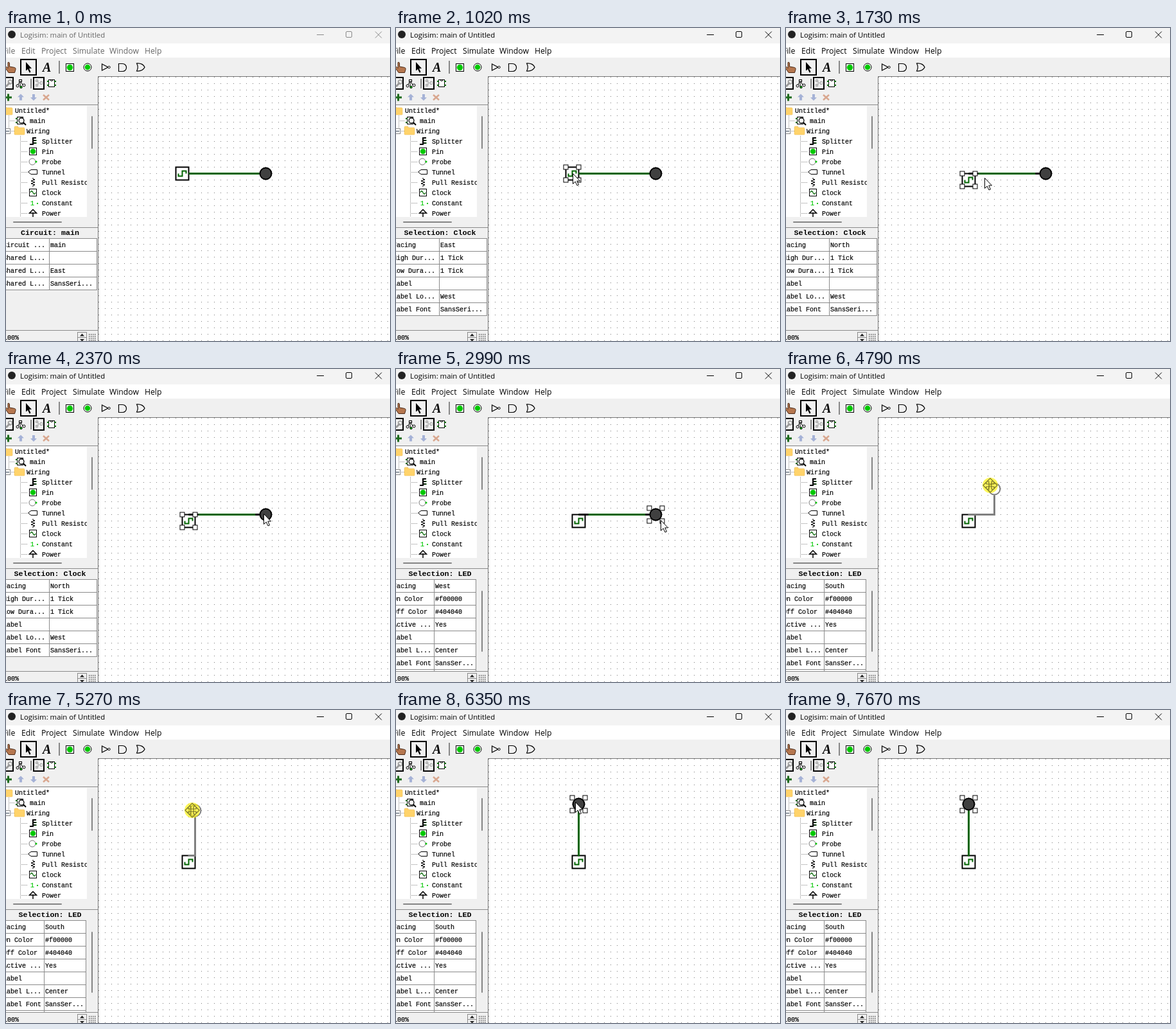
Recreate the animation shown at these times as an HTML page. Size 598 px wide and 487 px high, loop 7.91 s.

```html
<!DOCTYPE html>
<html lang="en">
<head>
<meta charset="utf-8">
<title>Circuit editor</title>
<style>
  html, body { margin: 0; width: 100%; height: 100%; overflow: hidden; background: #fff; }
  svg { display: block; }
  text { white-space: pre; }
  .ui { font-family: "Open Sans", "Noto Sans", sans-serif; }
  .mono { font: 10px "Liberation Mono", "DejaVu Sans Mono", monospace; stroke: #000; stroke-width: .2; }
  .head { font: bold 11.67px "Liberation Mono", monospace; text-anchor: middle; }
</style>
</head>
<body>
<svg id="stage" width="598" height="487" viewBox="0 0 598 487">
  <defs>
    <pattern id="grid" x="4" y="6" width="10" height="10" patternUnits="userSpaceOnUse">
      <rect width="1" height="1" fill="#777"/>
    </pattern>
    <pattern id="mini" x="129" y="476" width="3" height="3" patternUnits="userSpaceOnUse">
      <rect width="1.4" height="1.4" fill="#444"/>
    </pattern>
    <clipPath id="treeClip"><rect y="121" width="126" height="173"/></clipPath>
    <clipPath id="tableClip"><rect y="311" width="142" height="159"/></clipPath>
  </defs>
  <rect width="598" height="487" fill="#f0f0f0"/>
  <rect width="598" height="24" fill="#f3f3f3"/>
  <rect y="24" width="598" height="22" fill="#fff"/>
  <rect x="144" y="76" width="454" height="411" fill="#fff"/>
  <rect x="144" y="76" width="454" height="411" fill="url(#grid)"/>
  <path d="M143.5 487V75.5H598" fill="none" stroke="#777"/>
  <g id="chrome"></g>
  <g id="tools"></g>
  <g id="tree" clip-path="url(#treeClip)"></g>
  <path d="M134 138V187M12 302H86" stroke="#858585" stroke-width="2" stroke-linecap="round"/>
  <path d="M0 119.5H143M0 310.5H143M0 470.5H143" stroke="#8a8a8a"/>
  <g id="table" clip-path="url(#tableClip)"></g>
  <g id="status"></g>
  <g id="circuit" transform="translate(.5 .5)"></g>
  <g id="pointer"></g>
</svg>
<script>
const LOOP = 7910;
const el = id => document.getElementById(id);
const label = (x, y, s, cls = 'mono', extra = '') => `<text x="${x}" y="${y}" class="${cls}" ${extra}>${s}</text>`;
const line = (d, color = '#000', width = 1, extra = '') =>
  `<path d="${d}" fill="none" stroke="${color}" stroke-width="${width}" ${extra}/>`;
const shape = (d, fill, stroke = 'none', width = 1) =>
  `<path d="${d}" fill="${fill}" stroke="${stroke}" stroke-width="${width}"/>`;
const rect = (x, y, w, h, fill = 'none', stroke = '#000', width = 1) =>
  `<rect x="${x}" y="${y}" width="${w}" height="${h}" fill="${fill}" stroke="${stroke}" stroke-width="${width}"/>`;
const dot = (x, y, r, fill, stroke = 'none', width = 1) =>
  `<circle cx="${x}" cy="${y}" r="${r}" fill="${fill}" stroke="${stroke}" stroke-width="${width}"/>`;
const at = (x, y, body) => `<g transform="translate(${x} ${y})">${body}</g>`;

const LIME = '#00c800', WIRE = '#006400', GHOST = '#808080';

function chrome(active) {
  const ink = active ? '#000' : '#8a8a8a';
  const menuInk = active ? '#000' : '#666';
  const menus = [['File', -5], ['Edit', 24], ['Project', 55], ['Simulate', 104], ['Window', 161], ['Help', 216]];
  return dot(9, 10, 6, '#222') +
    label(22, 15, 'Logisim: main of Untitled', 'ui', `font-size="11.35" fill="${active ? '#000' : '#666'}"`) +
    menus.map(([s, x]) => label(x, 40, s, 'ui', `font-size="12.2" fill="${menuInk}"`)).join('') +
    line('M484 10.5H495M575 5.5L585 15.5M585 5.5L575 15.5', ink) +
    `<rect x="529.5" y="5.5" width="9" height="9" rx="1.5" fill="none" stroke="${ink}"/>`;
}

function tools() {
  const plusArrow = 'M0 -5L5 0H2V5H-2V0H-5Z';
  return shape('M3 53.5q2 -1 2.5 1V60l8 1.5q2 .5 1.500 3l-1.500 5H4L-1 62q0 -2 2 -1.500l2 2Z', '#b5774f', '#4b2a18') +
    rect(23, 49, 24, 24, 'none', '#000', 2) +
    shape('M31 53V66.500l3 -2.500 2.500 5.500 2 -1 -2.500 -5.500H40Z', '#000') +
    label(57, 68, 'A', '', 'font-family="Liberation Serif, serif" font-size="20" font-weight="bold" font-style="italic"') +
    line('M83 51V71', '#888', 2) +
    rect(93.5, 55.5, 12, 12, '#fff') + dot(99.5, 61.5, 4.7, LIME) +
    dot(127, 61, 6, '#fff', '#000') + dot(127, 61, 4.3, LIME) +
    line('M149.500 56V66L159 61Z', '#000', 1.2) + dot(160.5, 61, 1.700, '#fff', '#000') +
    line('M175.500 55.500H181.500A6 6 0 0 1 181.500 67.500H175.500Z', '#000', 1.2) +
    line('M203.500 55Q213 54.500 216 61Q213 67.500 203.500 67Q207 61 203.500 55Z', '#000', 1.2) +
    rect(-8, 77, 19, 18, 'none', '#000', 2) +
    line('M0 91L6 85', '#999', 3) + dot(6.500, 84, 3, 'none', '#999', 1.500) +
    line('M22 82L18 90M22 82L27 90M22 82V91', '#000', 1) +
    rect(20.500, 80.500, 4, 3, '#fff') + dot(18, 90, 2, '#fff', '#000') + dot(23.500, 92, 1.700, LIME, '#000') + dot(28, 89, 2, '#fff', '#000') +
    line('M39 79V94', '#888', 2) +
    rect(43, 77, 16, 18, 'none', '#000', 2) +
    line('M47 82H50V89H47M50 85.500H53', '#aaa') + rect(46.500, 80.500, 3, 3, 'none', '#aaa') + rect(53.500, 83.500, 3, 4, 'none', '#aaa') + rect(46.500, 87.500, 3, 3, 'none', '#aaa') +
    rect(66.500, 80.500, 9, 11, '#fff') + line('M64 83H67M64 89H67M75 83H78M75 89H78', WIRE, 2) + line('M69 80.500a2 2 0 0 0 4 0') +
    line('M-2 108H9M3.500 102.500V113.500', '#1d6b1d', 3) +
    at(23, 107.500, shape(plusArrow, '#a5b2d6')) + at(43, 108, `<g transform="rotate(180)">${shape(plusArrow, '#a5b2d6')}</g>`) +
    line('M58 104L67 112M67 104L58 112', '#d9a78f', 2.500);
}

function tree() {
  const folder = 'M0 1.500Q0 0 1.500 0H5L7 2H14.500Q16 2 16 3.500V12Q16 13 15 13H1Q0 13 0 12Z';
  const items = ['Splitter', 'Pin', 'Probe', 'Tunnel', 'Pull Resistor', 'Clock', 'Constant', 'Power'];
  const icons = [
    line('M-5 5H0V-5H5M0 -1H5M0 3H5', '#000', 2) + line('M2 -1H6M2 3H6', WIRE),
    rect(-5.500, -5.500, 11, 11, '#fff') + dot(0, 0, 4.300, LIME),
    dot(-1, 0, 5, '#fff', '#777') + dot(5, 0, 1.500, LIME),
    line('M-7.500 0L-3 -3.500H6.500V3.500H-3Z'),
    line('M0 -7V-5L3 -4L-3 -2L3 0L-3 2L3 4L0 5V7'),
    rect(-5.500, -5.500, 11, 11, '#fff') + line('M-4 0Q-2 -5 0 0T4 0', WIRE, 1.300),
    label(-4, 4, '1', 'mono', `style="fill:${LIME};stroke:${LIME}"`) + rect(6, 0, 2, 2, LIME, 'none'),
    line('M0 6V-1M-5.500 0L0 -5.500L5.500 0Z', '#000', 1.500)
  ];
  const dotted = 'stroke-dasharray="1 1"';
  let out = rect(0, 120, 126, 174, '#fff', 'none') +
    line('M4.500 136V156M4 144.500H14M22.500 168V294M8 160.500H13', '#888', 1, dotted) +
    at(-6, 122, shape(folder, '#ffd36b', '#e8b64a', .5)) + label(14, 132, 'Untitled*') +
    rect(17.500, 138.500, 9, 11, '#fff') + line('M15 141H18M15 147H18', WIRE, 2) +
    dot(24, 144, 4, '#fff', '#000', 1.300) + line('M27 147L31 151', '#000', 2) + label(37, 148, 'main') +
    rect(-1.500, 156.500, 8, 8, '#fff', '#888') + line('M0 160.500H5', '#345') +
    at(13, 153, shape(folder, '#ffd36b', '#e8b64a', .5)) + label(32, 164, 'Wiring');
  items.forEach((name, i) => {
    const y = 176 + 16 * i;
    out += line(`M22 ${y + .5}H33`, '#888', 1, dotted) + at(42, y, icons[i]) + label(56, y + 4, name);
  });
  return out;
}

const clockRows = facing => [['Facing', facing], ['High Dur...', '1 Tick'], ['Low Dura...', '1 Tick'],
  ['Label', ''], ['Label Lo...', 'West'], ['Label Font', 'SansSeri...']];
const ledRows = facing => [['Facing', facing], ['On Color', '#f00000'], ['Off Color', '#404040'],
  ['Active ...', 'Yes'], ['Label', ''], ['Label L...', 'Center'], ['Label Font', 'SansSer...']];
const mainRows = [['Circuit ...', 'main'], ['Shared L...', ''], ['Shared L...', 'East'], ['Shared L...', 'SansSeri...']];

function table(title, rows, narrow) {
  const [mid, right] = narrow ? [59.5, 124.5] : [67.5, 141.5];
  const bottom = 327.5 + 20 * rows.length;
  let out = label(68.5, 322, title, 'head') + rect(-1, 327.5, right + 1, bottom - 327.5, '#fff', '#8a8a8a') +
    line(`M${mid} 327V${Math.min(bottom, 470)}`, '#8a8a8a');
  if (narrow) out += rect(0, 468, 124, 3, '#fff', 'none') + line('M59.5 467V470M124.5 467V470', '#8a8a8a') +
    line('M134 346V439', '#858585', 2, 'stroke-linecap="round"');
  rows.forEach(([key, value], i) => {
    const y = 341 + 20 * i;
    out += line(`M0 ${y + 6.5}H${right}`, '#8a8a8a') + label(-5, y, key) + label(mid + 1.5, y, value);
  });
  return out;
}

const status = () => label(-4, 485, '100%') +
  rect(111.5, 473.5, 14, 8, '#f0f0f0', '#8a8a8a') + rect(111.5, 481.5, 14, 8, '#f0f0f0', '#8a8a8a') +
  shape('M115 479.500H122L118.500 475.500ZM115 484H122L118.500 487.500Z', '#222') +
  rect(129, 476, 12, 11, 'url(#mini)', 'none');

const handles = (x, y) => [[-10, -10], [10, -10], [-10, 10], [10, 10]]
  .map(([dx, dy]) => rect(x + dx - 3.5, y + dy - 3.5, 7, 7, '#fff')).join('');
const clock = (x, y) => rect(x - 10, y - 10, 20, 20, '#fff', '#000', 2) +
  line(`M${x - 6} ${y}v4h6v-8h6v4`, WIRE, 2);
const led = (x, y) => dot(x, y, 9, '#404040', '#000', 2);

// Times of the user's actions, in ms
const CLICK_CLOCK = 640, TURN_CLOCK = 1560, CLICK_LED = 2530, TURN_LED = 3140, DRAG = 4180, DROP = 6350, LEAVE = 7670;
const between = (t, a, b) => t >= a && t < b;

const path = [
  [150, 430, 400], [620, 276, 228], [780, 275, 226], [1020, 275, 226], [1200, 279, 221], [1410, 282, 235],
  [1560, 282, 235], [2280, 397, 226], [2370, 401, 225], [2530, 401, 225], [2990, 412, 235], [3470, 412, 235],
  [3700, 391, 215], [3940, 392, 213], [4180, 392, 213], [4320, 363, 209], [4400, 363, 209], [4950, 299, 169],
  [5030, 299, 169], [5270, 290, 156], [5350, 290, 156], [5810, 281, 143], [6349, 281, 143], [6350, 279, 143],
  [7200, 279, 143], [7670, 466, 490]
];

function pointerAt(t) {
  const i = Math.max(1, path.findIndex(k => k[0] > t));
  const [t0, x0, y0] = path[i - 1], [t1, x1, y1] = path[i];
  const p = Math.max(0, (t - t0) / (t1 - t0));
  return [Math.round(x0 + (x1 - x0) * p), Math.round(y0 + (y1 - y0) * p)];
}

const snap = v => 10 * Math.round(v / 10);

function circuit(t) {
  const turned = t >= TURN_CLOCK;
  const [cx, cy] = turned ? [284, 236] : [274, 226];
  const clockBody = clock(cx, cy) + (between(t, CLICK_CLOCK, CLICK_LED) ? handles(cx, cy) : '');
  if (t >= DROP) return clockBody + line('M284 155V227', WIRE, 3) + led(284, 146) + handles(284, 146);
  if (t >= DRAG) {
    const [px, py] = pointerAt(t);
    const x = 394 + snap(px - 392), y = 216 + snap(py - 213);
    return clockBody + line(`M283 226H${x}V${y + 10}`, GHOST, 3) + dot(x, y, 9, 'none', GHOST, 2);
  }
  const [lx, ly] = t >= TURN_LED ? [394, 216] : [404, 226];
  const stubs = turned ? line('M284 226H299M388 226H394', '#000', 3) : '';
  return clock(cx, cy) + line('M284 226H395', WIRE, 3) + stubs + led(lx, ly) +
    (between(t, CLICK_CLOCK, CLICK_LED) ? handles(cx, cy) : '') + (t >= CLICK_LED ? handles(lx, ly) : '');
}

const arrow = shape('M.5 .5V16.500L4.200 13L7 19L9.500 18L6.800 12H11.500Z', '#fff', '#000');
const moveArrows = [0, 90, 180, 270].map(a =>
  `<g transform="rotate(${a})">${line('M-2 -2V-6H-5L0 -11L5 -6H2V-2Z', '#77742c', 1.2)}</g>`).join('');

function pointer(t) {
  if (t < 150 || t >= LEAVE) return '';
  const dragging = between(t, DRAG, DROP);
  const pressed = dragging || between(t, CLICK_CLOCK, 720) || between(t, CLICK_LED, 2650);
  const glow = pressed ? '<circle r="12" fill="#fff200" fill-opacity=".65"/>' : '';
  return at(...pointerAt(t), glow + (dragging ? moveArrows : arrow));
}

function panel(t) {
  if (t < CLICK_CLOCK) return table('Circuit: main', mainRows);
  if (t < CLICK_LED) return table('Selection: Clock', clockRows(t < TURN_CLOCK ? 'East' : 'North'));
  return table('Selection: LED', ledRows(t < TURN_LED ? 'West' : 'South'), true);
}

const shown = {};
function put(id, markup) {
  if (shown[id] !== markup) el(id).innerHTML = shown[id] = markup;
}

function draw(t) {
  put('chrome', chrome(t >= CLICK_CLOCK));
  put('table', panel(t));
  put('circuit', circuit(t));
  put('pointer', pointer(t));
}

put('tools', tools());
put('tree', tree());
put('status', status());
const start = performance.now();
function tick() {
  draw((performance.now() - start) % LOOP);
  requestAnimationFrame(tick);
}
tick();
</script>
</body>
</html>
```
